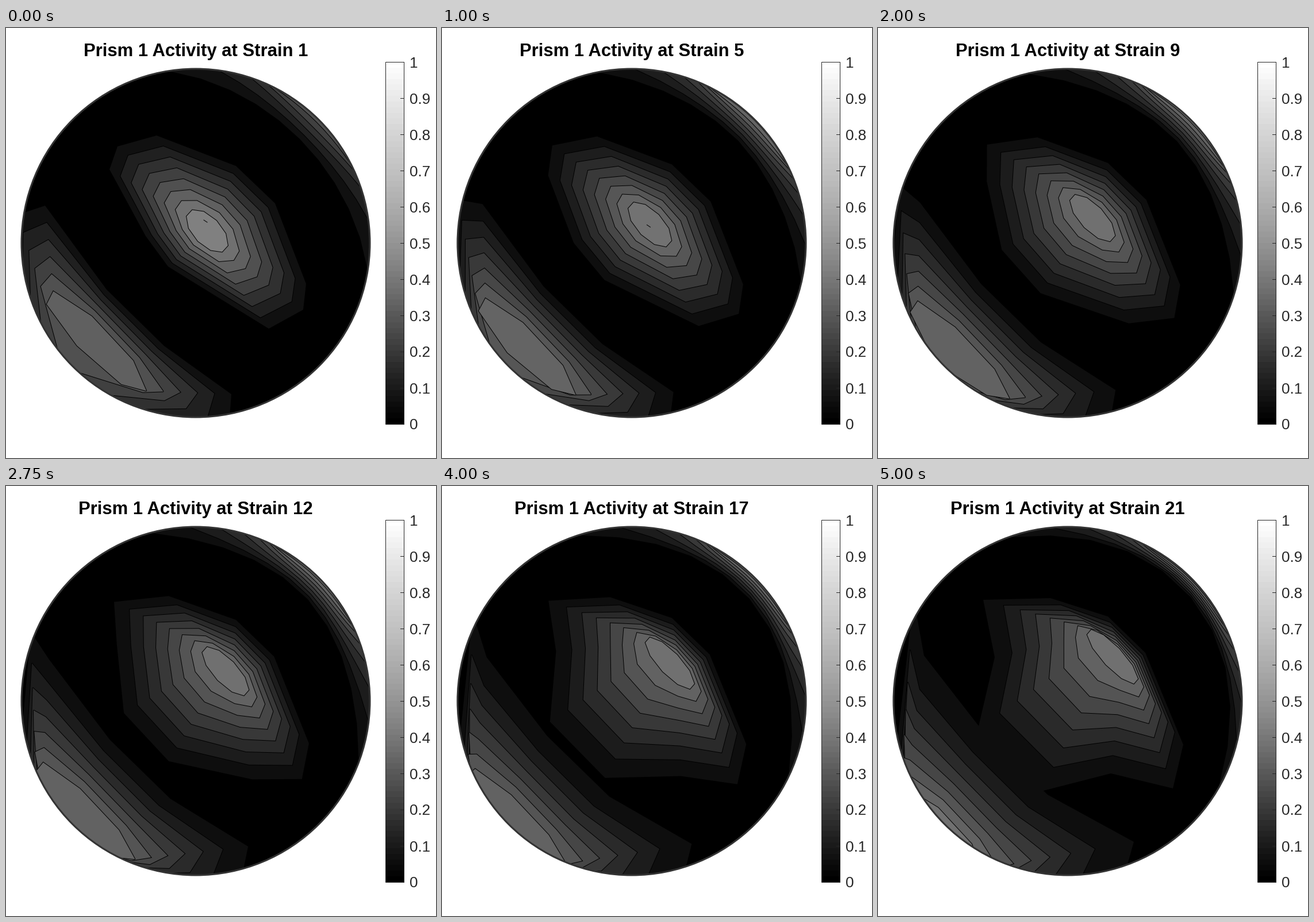
Write a matplotlib script that moves like this. It is 748x748 px and loops after 5250 ms.

```python
import numpy as np
import matplotlib.pyplot as plt
from matplotlib.animation import FuncAnimation
from matplotlib.patches import Circle, Polygon, Rectangle

SIZE, DPI = 748, 100
PX = 72 / DPI
STRAINS = 21
LEVELS = range(1, 9)
CX, CY, R = 330, 374, 303
plt.rcParams["font.family"] = "Liberation Sans"


def mix(a, b, u):
    return a + (b - a) * u


def oval(x, y, length, width, tilt, count, start):
    """Corners of a tilted ellipse, clockwise on screen."""
    phi = np.radians(start + np.arange(count) * 360 / count)
    c, s = np.cos(np.radians(tilt)), np.sin(np.radians(tilt))
    along, across = length * np.cos(phi), width * np.sin(phi)
    return np.column_stack([x + along * c - across * s,
                            y + along * s + across * c])


# Foot of the central hill at the first and last strain, clockwise from west
CORE_FOOT = [np.array(p, float) for p in (
    [(180, 246), (194, 206), (262, 187), (400, 240), (468, 305),
     (522, 445), (517, 490), (457, 523), (282, 415), (243, 362)],
    [(203, 298), (183, 198), (300, 195), (400, 227), (465, 290),
     (531, 450), (513, 526), (405, 500), (284, 531), (174, 422)])]
CORE_TOP = [oval(350, 353, 46, 24, 46, 10, 160),
            oval(408, 297, 62, 18, 47, 10, 160)]

# Foot of the lower left hill, from the west rim round to the far corner
LOW_FOOT = [np.array(p, float) for p in (
    [(20, 325), (68, 309), (175, 455), (275, 553), (392, 637),
     (388, 690), (0, 740)],
    [(62, 195), (80, 295), (185, 430), (295, 537), (445, 619),
     (425, 690), (0, 740)])]
LOW_TOP = [oval(156, 546, 123, 28, 45, 7, 150),
           oval(108, 598, 100, 26, 45, 7, 150)]


def ring(foot, top, u, t):
    """Outline at height t (0 foot, 1 top) and strain progress u."""
    return mix(mix(*foot, u), mix(*top, u), t)


def core(level, u):
    t = (level - 1) / 7
    return ring(CORE_FOOT, CORE_TOP, u, t ** (1 - 0.15 * u))


def low(level, u):
    t = (level - 1) / (5 + 2 * u ** 0.4)
    return ring(LOW_FOOT, LOW_TOP, u, t ** (1 - 0.3 * u)) if t <= 1 else None


def high(level, u):
    """Crescent along the upper right rim."""
    t = (level - 1) / (7.5 - 3 * np.exp(-10 * u))
    if t > 1:
        return None
    span = 18 + mix(36, 52, u) * (1 - t) ** 2.5
    depth = (47 - 24 * u ** 2) * (1 - t)
    x = np.linspace(-1, 1, 11)
    theta = np.radians(-45 + 5 * u * (1 - t) + span * x)
    radius = R - depth * (1 - abs(x) ** (2 + 2 * u))
    theta = np.concatenate([theta, theta[::-1]])
    radius = np.concatenate([radius, np.full(x.size, R + 20)])
    return np.column_stack([CX + radius * np.cos(theta),
                            CY + radius * np.sin(theta)])


HILLS = (core, low, high)

fig = plt.figure(figsize=(SIZE / DPI, SIZE / DPI), dpi=DPI, facecolor="white")
ax = fig.add_axes([0, 0, 1, 1])
ax.axis("off")
title = ax.text(CX, 49, "", size=31 * PX, weight="bold", ha="center",
                va="baseline", color="black")

# Each level: all outlines first, then all fills, so touching hills merge
disc = ax.add_patch(Circle((CX, CY), R, fc="black", ec="none", zorder=1))


def patch_set(z, lw):
    patches = [Polygon(np.zeros((3, 2)), fc="black", ec="black", lw=lw * PX,
                       zorder=z) for _ in HILLS]
    for p in patches:
        ax.add_patch(p)
        p.set_clip_path(disc)
    return patches


layers = [(k, patch_set(2 * k, 2), patch_set(2 * k + 1, 0)) for k in LEVELS]
peak, = ax.plot([], [], color="black", lw=PX, zorder=30)
ax.add_patch(Circle((CX, CY), R, fill=False, ec="#333333", lw=3 * PX,
                    zorder=31))

# Colour bar
X0, X1, TOP, BOTTOM = 660.5, 692.5, 59, 689
v = np.linspace(1, 0, 64)[:, None]
ax.imshow(v + 0.08 * np.sin(np.pi * v) ** 2, cmap="gray", vmin=0, vmax=1,
          extent=(X0, X1, BOTTOM, TOP), aspect="auto",
          interpolation="nearest", zorder=1)
ax.add_patch(Rectangle((X0, TOP), X1 - X0, BOTTOM - TOP, fill=False,
                       ec="#262626", lw=PX, zorder=3))
for n in range(11):
    y = mix(BOTTOM, TOP, n / 10)
    ax.plot([X1 - 6, X1], [y, y], color="#262626", lw=PX, zorder=3)
    ax.text(702, y + 9.5, f"{n / 10:g}", size=26 * PX, color="#262626",
            va="baseline")
ax.set_xlim(0, SIZE)
ax.set_ylim(SIZE, 0)


def update(i):
    u = i / (STRAINS - 1)
    title.set_text(f"Prism 1 Activity at Strain {i + 1}")
    step = (14 + 2 * np.exp(-10 * u)) / 255
    for level, edges, fills in layers:
        for hill, edge, fill in zip(HILLS, edges, fills):
            outline = hill(level, u)
            for p in (edge, fill):
                p.set_visible(outline is not None)
                if outline is not None:
                    p.set_xy(outline)
            fill.set_facecolor(str(step * level))
    # Short dash on the summit while the central hill is the highest
    x, y = 347 + 62 * u, 336 + 42 * u
    peak.set_data([x - 3, x + 3], [y - 2, y + 2])
    peak.set_visible(u <= 0.2)
    return []


anim = FuncAnimation(fig, update, frames=STRAINS, interval=250, repeat=True,
                     repeat_delay=0, blit=False)
plt.show()
```
